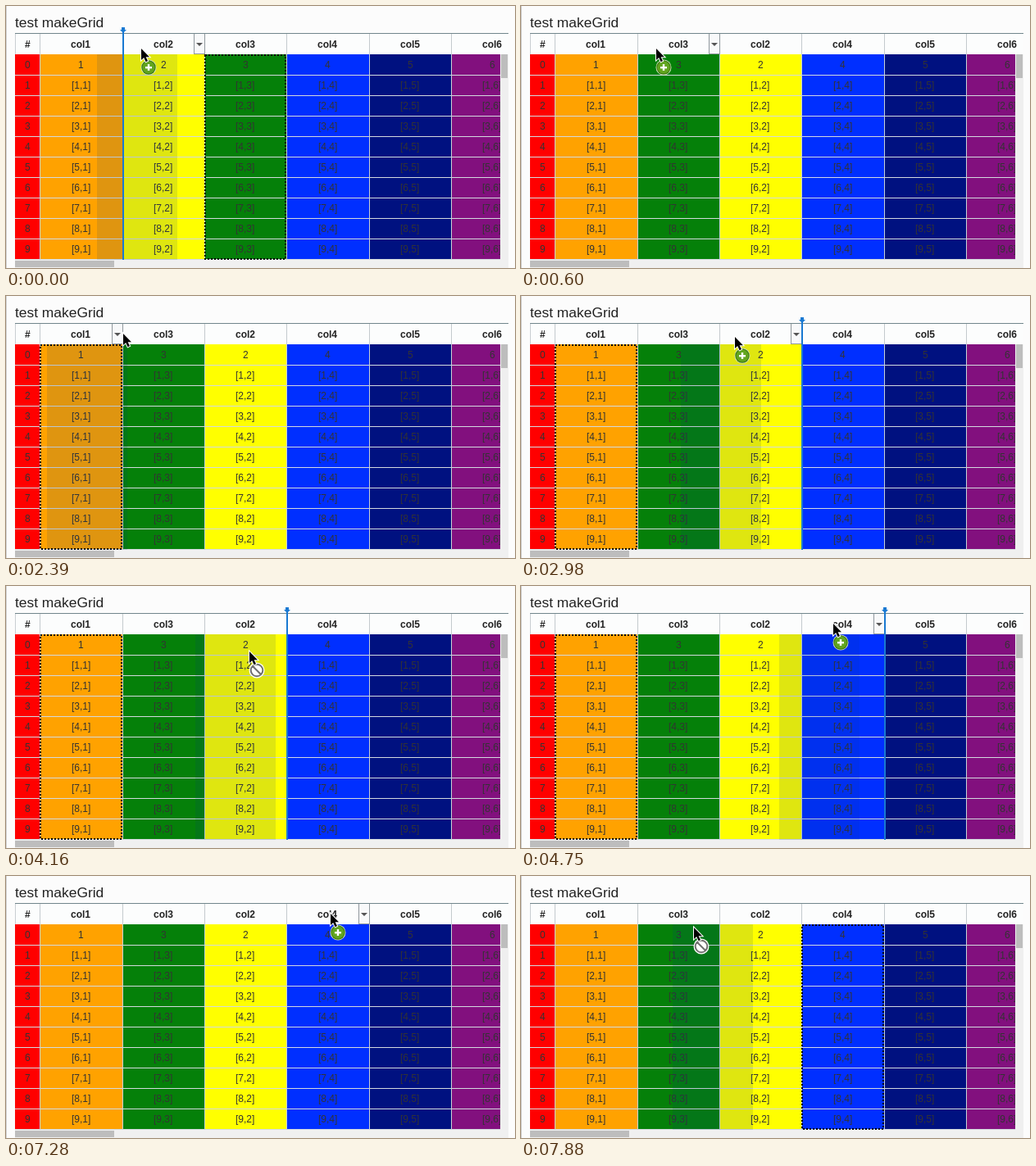
An HTML page with a canvas for the animation above (8000 ms loop, 621 by 320 pixels).

```html
<!DOCTYPE html>
<html lang="en">
<head>
<meta charset="utf-8">
<title>test makeGrid</title>
<style>
  html, body { margin: 0; width: 100%; height: 100%; overflow: hidden; background: #fcfcfc; }
  canvas { display: block; width: 621px; height: 320px; }
</style>
</head>
<body>
<canvas id="stage" width="621" height="320"></canvas>
<script>
const ctx = document.getElementById('stage').getContext('2d');
const FONT = '"Liberation Sans", Arial, sans-serif';
const LOOP = 8000, TOP = 59, ROW = 25, ROWS = 10, BOTTOM = 310;
const FILLS = ['#ffa200', '#ffff00', '#058009', '#002fff', '#001180', '#82107e'];
const edge = i => Math.round(41.4 + 100.35 * i);

// Pointer steps: time, x, y, badge, optional x of the lagging drag ghost
const PATH = [
  [0, 164, 52, '+'], [750, 164, 52, ''],
  [1200, 175, 80, ''], [1350, 180, 102, ''], [1500, 178, 122, ''],
  [1640, 174, 88, ''], [1790, 152, 48, ''], [1940, 105, 46, ''],
  [2390, 142, 46, '', 50], [2540, 170, 46, '+', 84], [2690, 204, 46, '+'],
  [2840, 236, 47, '+'], [2980, 260, 50, '+'], [3130, 276, 64, 'x'],
  [3280, 281, 80, 'x'], [3570, 281, 50, '+'], [3720, 281, 18, 'x'],
  [4010, 286, 44, '+'], [4160, 296, 80, 'x'], [4310, 318, 72, 'x'],
  [4460, 345, 60, 'x'], [4600, 368, 48, '+'], [4750, 380, 46, '+'],
  [4900, 386, 45, '+'], [5040, 391, 44, '+'], [5190, 400, 38, '+'],
  [5340, 408, 30, 'x'], [5490, 404, 20, 'x'], [5640, 398, 12, 'x'],
  [5780, 395, 8, 'x'], [6680, 395, 10, ''], [6830, 395, 28, ''],
  [6980, 395, 46, ''], [7280, 395, 46, '+'],
  [7730, 366, 50, '+', 330], [7880, 210, 63, 'x', 185]
].map(([at, x, y, badge, ghost]) => ({ at, x, y, badge, ghost }));

const DRAGS = [
  { from: 0, to: 450, col: 2, grip: 53 },
  { from: 2390, to: 6680, col: 0, grip: 65 },
  { from: 7730, to: LOOP, col: 3, grip: 53 }
];

function rect(x, y, w, h, color) {
  ctx.fillStyle = color;
  ctx.fillRect(x, y, w, h);
}

function poly(points, color) {
  ctx.beginPath();
  points.forEach(([x, y]) => ctx.lineTo(x, y));
  ctx.closePath();
  ctx.fillStyle = color;
  ctx.fill();
}

function label(str, mid, base, style = '12px', color = '#333') {
  ctx.font = style + ' ' + FONT;
  ctx.fillStyle = color;
  ctx.fillText(str, Math.round(mid - ctx.measureText(str).width / 2), base);
}

function columnAt(x) {
  for (let i = 0; i < 6; i++) if (x > edge(i) && x <= edge(i + 1)) return i;
  return -1;
}

const inHeader = p => p.y > 33 && p.y < TOP;

function drawPage() {
  rect(0, 0, 621, 320, '#fcfcfc');
  rect(0, 0, 1, 320, '#cfcfcf');
  ctx.font = '17.4px ' + FONT;
  ctx.fillStyle = '#222';
  ctx.fillText('test makeGrid', 11, 26);
  rect(11, 34, 602, 25, '#fcfdfd');
  rect(11, 33, 602, 1, '#71868c');
  rect(11, 34, 1, 25, '#c9ced2');
}

function drawColumn(left, right, fill, title, cell) {
  const mid = (left + right) / 2;
  label(title, mid, 51, 'bold 12px', '#222');
  rect(right, 34, 1, 25, '#c4cace');
  ctx.save();
  ctx.beginPath();
  ctx.rect(11, TOP, 592, BOTTOM - TOP);
  ctx.clip();
  rect(left, TOP, right - left, BOTTOM - TOP, fill);
  for (let r = 0; r < ROWS; r++) {
    const y = TOP + r * ROW;
    rect(left, y + ROW, right - left, 1, '#d3dade');
    label(cell(r), mid, y + 17);
  }
  rect(right, TOP, 1, BOTTOM - TOP, '#c8d2d8');
  ctx.restore();
}

function drawGrid(order) {
  for (let i = 5; i >= 0; i--) {
    const c = order[i];
    drawColumn(edge(i), edge(i + 1), FILLS[c], 'col' + (c + 1),
      r => r ? `[${r},${c + 1}]` : String(c + 1));
  }
  drawColumn(11, 41, '#ff0000', '#', String);
}

function drawScrollbars() {
  rect(603, TOP, 10, BOTTOM - TOP, '#efefef');
  rect(604, TOP, 8, 29, '#bdbdbd');
  rect(11, 310, 602, 10, '#f0f0f0');
  rect(11, 311, 121, 8, '#bdbdbd');
}

function drawHover(p, order) {
  const i = columnAt(p.x), r = Math.floor((p.y - TOP) / ROW), c = order[i];
  const left = edge(i), right = edge(i + 1), y = TOP + r * ROW;
  rect(left + 1, y + (r ? 1 : 0), right - left - 1, ROW - (r ? 1 : 0), '#dce8f8');
  label(r ? `[${r},${c + 1}]` : String(c + 1), (left + right) / 2, y + 17);
}

function drawMenuButton(i) {
  const x = edge(i + 1) - 13;
  rect(x, 34, 14, 25, '#8f979c');
  rect(x + 1, 34, 12, 24, '#f8f9fa');
  poly([[x + 3, 45], [x + 11, 45], [x + 7, 49]], '#555');
}

function drawDropLine(x) {
  rect(x, 32, 2, BOTTOM - 32, '#1979d2');
  rect(x - 1, 26, 4, 3, '#1979d2');
  poly([[x - 3, 29], [x + 5, 29], [x + 1, 33]], '#1979d2');
}

function drawDrag(drag, p, now) {
  const left = edge(drag.col), right = edge(drag.col + 1);
  ctx.strokeStyle = '#000';
  ctx.lineWidth = 2;
  ctx.setLineDash([2, 2]);
  ctx.strokeRect(left + 1, 60, right - left - 2, 249);
  ctx.setLineDash([]);

  rect(p.ghost ?? p.x - drag.grip, TOP, 98, BOTTOM - TOP, 'rgba(0,60,130,.125)');

  // The drop line stays at the last header passed
  const over = PATH.filter(k => k.at >= drag.from && k.at <= now && inHeader(k)).pop();
  const target = over ? columnAt(over.x) : drag.col;
  if (target < drag.col) drawDropLine(edge(target));
  if (target > drag.col) drawDropLine(edge(target + 1));
}

function drawBadge(kind, x, y) {
  const disc = (r, color) => {
    ctx.beginPath();
    ctx.arc(x, y, r, 0, 7);
    ctx.fillStyle = color;
    ctx.fill();
  };
  if (kind === '+') {
    disc(9.5, '#d9e6c8');
    disc(8.7, '#3f7d10');
    disc(7.6, '#62a51f');
    rect(x - 4, y - 1, 8, 2.4, '#fff');
    rect(x - 1.2, y - 4, 2.4, 8, '#fff');
    return;
  }
  disc(9.5, '#fff');
  ctx.strokeStyle = '#707070';
  ctx.lineWidth = 2;
  ctx.beginPath();
  ctx.arc(x, y, 7.3, 0, 7);
  ctx.moveTo(x - 5, y - 5);
  ctx.lineTo(x + 5, y + 5);
  ctx.stroke();
}

function drawArrow(x, y) {
  const tip = [[0, 0], [0, 14], [3.2, 11], [5.6, 16.2], [8, 15.1], [5.6, 10.2], [10, 10.2]]
    .map(([dx, dy]) => [x + 1 + dx, y + dy]);
  poly(tip, '#000');
  ctx.strokeStyle = '#fff';
  ctx.lineWidth = 2;
  ctx.stroke();
  poly(tip, '#000');
}

function drawCross(x, y) {
  const plus = (arm, half, color) => {
    rect(x - arm, y - half, arm * 2, half * 2, color);
    rect(x - half, y - arm, half * 2, arm * 2, color);
  };
  plus(7, 3, '#000');
  plus(6, 2, '#fff');
}

function render(now) {
  const p = PATH.filter(k => k.at <= now).pop();
  const drag = DRAGS.find(d => now >= d.from && now < d.to);
  const order = now < 450 ? [0, 1, 2, 3, 4, 5] : [0, 2, 1, 3, 4, 5];
  const overCell = !drag && p.y >= TOP;

  drawPage();
  drawGrid(order);
  if (overCell) drawHover(p, order);
  drawScrollbars();
  if (inHeader(p)) drawMenuButton(columnAt(p.x));
  if (drag) drawDrag(drag, p, now);
  if (overCell) {
    drawCross(p.x, p.y);
  } else {
    if (p.badge) drawBadge(p.badge, p.x + 10, p.y + 23);
    drawArrow(p.x, p.y);
  }
}

const start = performance.now();
function tick() {
  render((performance.now() - start) % LOOP);
  requestAnimationFrame(tick);
}
tick();
</script>
</body>
</html>
```
